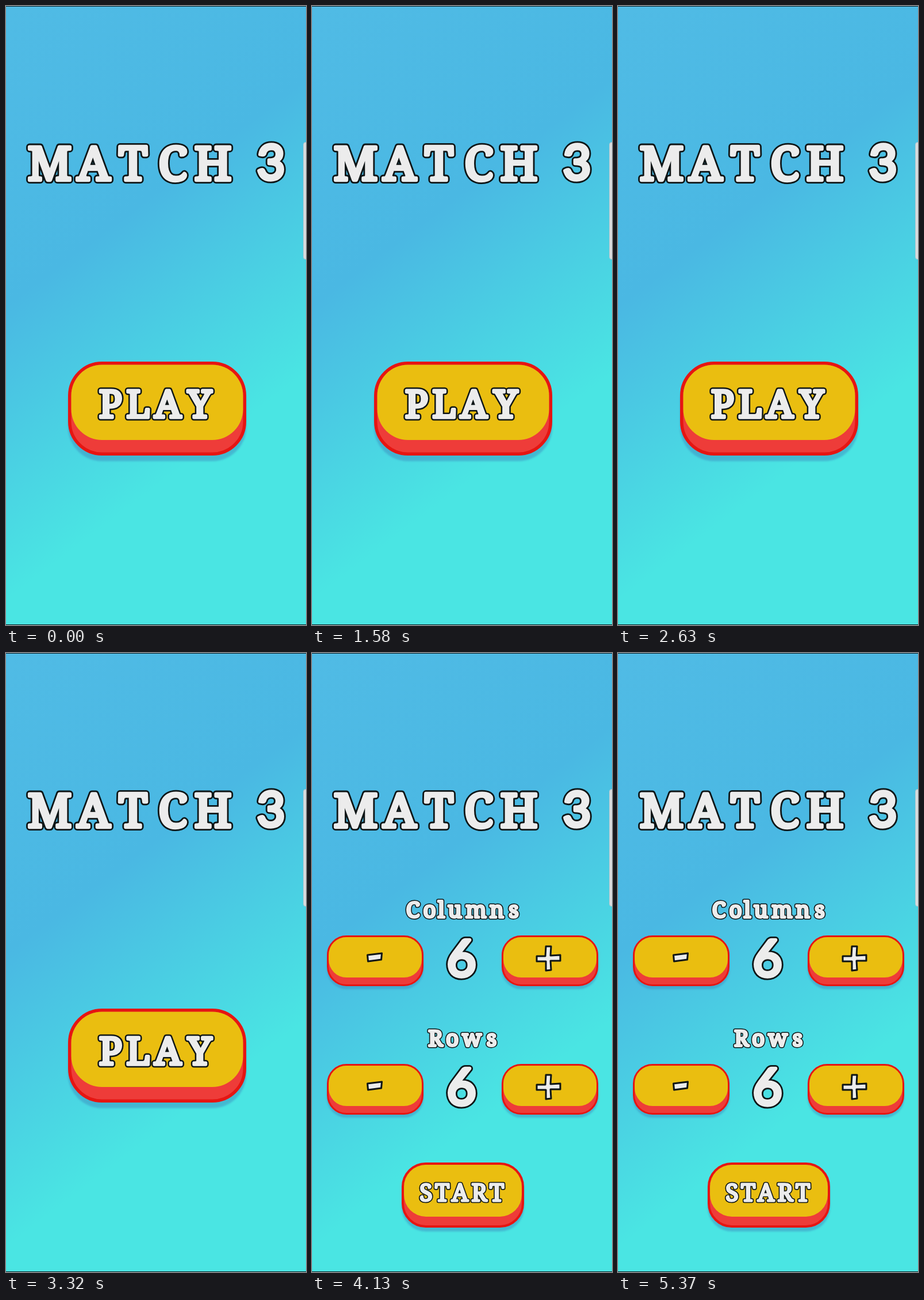
An HTML page for the animation above (5790 ms loop, 522x1074 px).

```html
<!DOCTYPE html>
<html lang="en">
<head>
<meta charset="utf-8">
<title>Match 3 menu</title>
<style>
  html, body { margin: 0; width: 100%; height: 100%; overflow: hidden; background: #4ab8e3; }
  svg { display: block; width: 100vw; height: 100vh; }
  text { text-anchor: middle; stroke-linejoin: round; font-weight: 400; }
  .slab { font-family: "Noto Serif", serif; }
  .digit { font-family: Lato, sans-serif; }
</style>
</head>
<body>
<svg viewBox="0 0 522 1074" preserveAspectRatio="none">
  <defs>
    <linearGradient id="sky" gradientUnits="userSpaceOnUse" x1="-246" y1="194" x2="246" y2="846">
      <stop offset="0" stop-color="#50bbe5"/>
      <stop offset=".5" stop-color="#4ab8e3"/>
      <stop offset="1" stop-color="#4ae5e3"/>
    </linearGradient>
    <filter id="soft" x="-10%" y="-20%" width="120%" height="140%">
      <feGaussianBlur stdDeviation="1.5"/>
    </filter>
  </defs>
  <rect width="522" height="1074" fill="url(#sky)"/>
  <rect width="522" height="1" fill="#0a1a20"/>
  <rect y="1073" width="522" height="1" fill="#0a1a20"/>
  <rect x="517.5" y="236.5" width="20" height="203" rx="4" fill="#d8dcde" stroke="#a9c6d0"/>
  <g id="title"></g>
  <g id="home">
    <g id="playUp"></g>
    <g id="playDown"></g>
    <g id="playLabel"></g>
  </g>
  <g id="setup"></g>
</svg>
<script>
const LOOP = 5790, PRESS = 4060, OPEN = 4130;
const INK = '#0e1516', PAPER = '#ececec', FACE = '#eabe10', LIP = '#ee3c39', RIM = '#e61512';
const byId = id => document.getElementById(id);

function add(parent, tag, attrs, content = '') {
  const node = document.createElementNS('http://www.w3.org/2000/svg', tag);
  for (const key in attrs) node.setAttribute(key, attrs[key]);
  node.textContent = content;
  parent.append(node);
  return node;
}

// Rounded lettering: a wide dark copy below a thickened light one.
function lettering(parent, words, centers, y, size, weight, outline, font = 'slab') {
  const base = { x: centers, y, 'font-size': size, class: font };
  add(parent, 'text', { ...base, fill: INK, stroke: INK,
    'stroke-width': weight + 2 * outline, 'aria-hidden': true }, words);
  add(parent, 'text', { ...base, fill: PAPER, stroke: PAPER, 'stroke-width': weight }, words);
}

function button(parent, x, y, w, h, radius, rim, lip, lipColor = LIP) {
  const edge = { x: x + rim / 2, y: y + rim / 2, width: w - rim, rx: radius - rim / 2, 'stroke-width': rim };
  add(parent, 'rect', { x, y: y + h * .06, width: w, height: h, rx: radius,
    fill: '#3c8fc0', opacity: .5, filter: 'url(#soft)' });
  add(parent, 'rect', { ...edge, height: h - rim, fill: lipColor, stroke: lipColor === LIP ? RIM : lipColor });
  if (lipColor !== LIP) add(parent, 'rect', { ...edge, height: h - lip, fill: RIM, stroke: RIM });
  add(parent, 'rect', { x: x + rim, y: y + rim, width: w - 2 * rim, height: h - rim - lip,
    rx: radius - rim, fill: FACE });
}

function icon(parent, x, y, d) {
  add(parent, 'path', { d, transform: `translate(${x} ${y})`, fill: PAPER, stroke: INK,
    'stroke-width': 3, 'stroke-linejoin': 'round' });
}

const MINUS = 'M-12-4 L13-7 L12 4 L-11 7Z';
const PLUS = 'M-4-21 L5-21 L4-5 L21-6 L21 4 L4 4 L5 20 L-4 21 L-4 5 L-20 5 L-20-4 L-5-4Z';

function stepper(parent, y) {
  button(parent, 26, y, 168, 88, 34, 3, 15);
  button(parent, 330, y, 168, 88, 34, 3, 15);
  icon(parent, 108.5, y + 38, MINUS);
  icon(parent, 411, y + 40, PLUS);
  lettering(parent, '6', 260, y + 70.5, 88, 6.5, 2.8, 'digit');
}

const title = byId('title');
lettering(title, 'MATCH', '76 152.5 221 290 360', 301.5, 81, 6.4, 2.8);
lettering(title, '3', 461, 301, 84, 6.5, 2.8, 'digit');

button(byId('playUp'), 108, 617, 310, 163, 59, 5.5, 27);
button(byId('playDown'), 92, 618, 342, 161, 64, 6, 10, '#ea433a');
lettering(byId('playLabel'), 'PLAY', '182 230 281.5 337', 713.5, 66, 5.5, 2.5);

const setup = byId('setup');
lettering(setup, 'Columns', '175.5 204.5 225 248.5 285.5 321.5 351', 458.5, 38.5, 4, 1.5);
stepper(setup, 490);
lettering(setup, 'Rows', '215 244 278 312.5', 682, 38.5, 4, 1.5);
stepper(setup, 713);
button(setup, 156, 884, 213, 113, 42, 4, 19);
lettering(setup, 'START', '198.5 226.5 257.5 291 321.5', 950.5, 41, 3.4, 1.6);

const show = (id, visible) => byId(id).setAttribute('display', visible ? 'inline' : 'none');

function render(t) {
  const pressed = t >= PRESS;
  show('home', t < OPEN);
  show('playUp', !pressed);
  show('playDown', pressed);
  show('setup', t >= OPEN);
}

let start;
function tick(now) {
  start ??= now;
  render((now - start) % LOOP);
  requestAnimationFrame(tick);
}
render(0);
requestAnimationFrame(tick);
</script>
</body>
</html>
```
